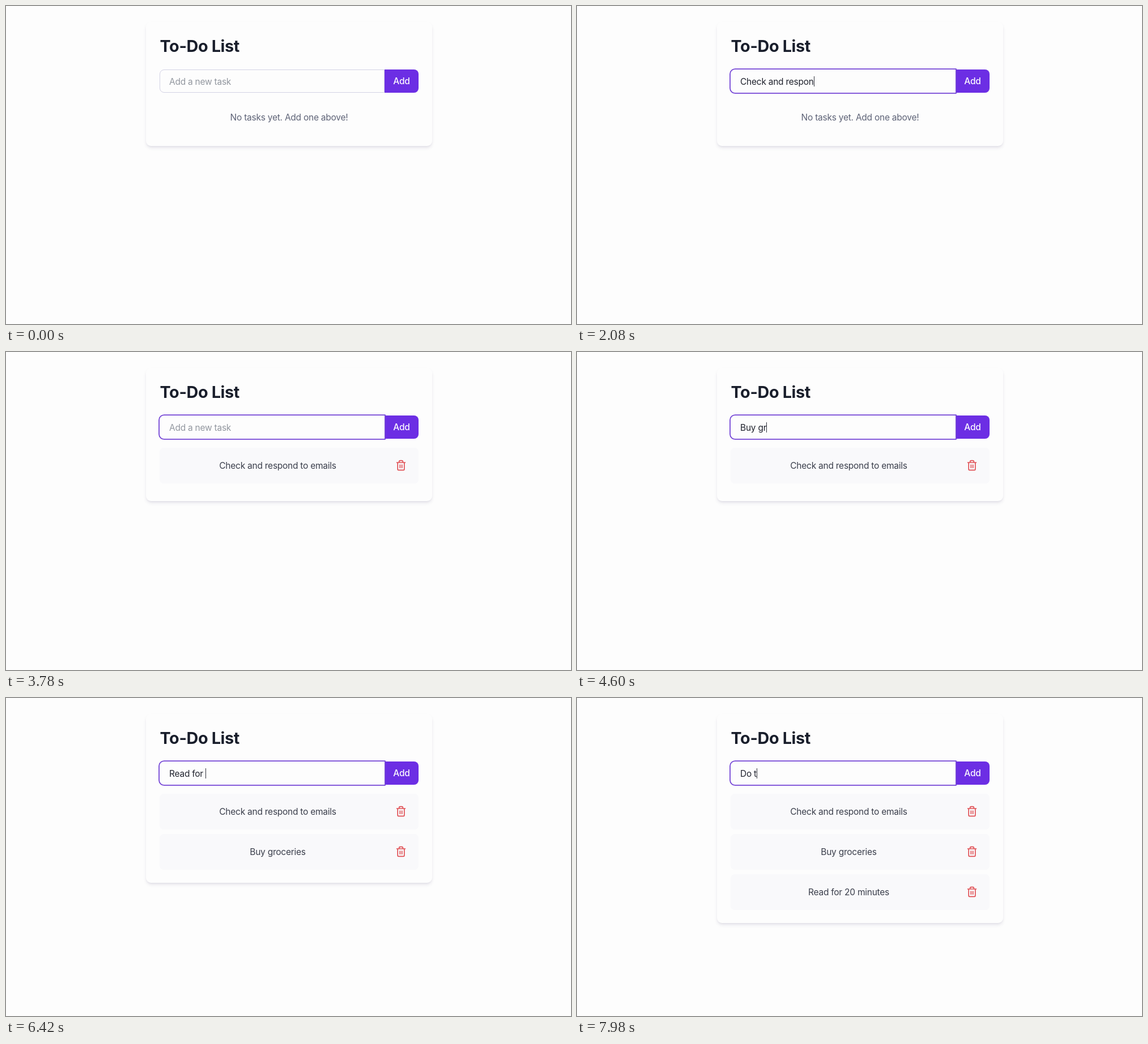
Recreate the animation shown at these times as an HTML page. Size 997x561 px, loop 8000 ms.

```html
<!DOCTYPE html>
<html lang="en">
<head>
<meta charset="utf-8">
<title>To-Do List</title>
<style>
  html, body { margin: 0; width: 100%; height: 100%; overflow: hidden; background: #fdfdfd; }
  body { position: relative; font: 15.5px/24px Inter, "Open Sans", sans-serif; letter-spacing: -.016em; }
  body > *, .item > * { position: absolute; box-sizing: border-box; margin: 0; white-space: pre; }
  #card {
    left: 247px; top: 28px; width: 505px; border-radius: 9px; background: #fdfdfd;
    box-shadow: 0 4px 6px -1px rgba(40, 30, 90, .1), 0 2px 4px -2px rgba(40, 30, 90, .1);
  }
  h1 { left: 271.5px; top: 52.5px; font-size: 28.8px; line-height: 36px; letter-spacing: -.013em; color: #191e2b; }
  #field {
    left: 271px; top: 111.5px; width: 397px; height: 41.5px; padding: 9px 16px 0;
    border: 1px solid #d3d2e4; border-radius: 8px 0 0 8px; color: #20232e;
  }
  #field.focus { border-color: transparent; box-shadow: 0 0 0 1.8px #7445d6; }
  #field.empty #text { color: #92979f; }
  #caret { position: absolute; top: 11px; width: 1px; height: 18px; background: #30323c; }
  #add {
    left: 668px; top: 111.5px; width: 60px; height: 41.5px; border-radius: 0 8px 8px 0;
    background: #6c2ee4; color: #fbf9ff; font-weight: 500; line-height: 42.5px; text-align: center;
  }
  #none { left: 247px; top: 185px; width: 505px; text-align: center; color: #5d6276; }
  .item { left: 271px; width: 457px; height: 63.5px; border-radius: 7px; background: #f9f9fb; color: #3a3e4b; }
  .item span { left: 0; top: 20px; width: 417px; text-align: center; }
  .item svg { left: 415.7px; top: 21.8px; width: 20px; height: 20px; }
</style>
</head>
<body>
<div id="card"></div>
<h1>To-Do List</h1>
<div id="add">Add</div>
<div id="field"><span id="text"></span><i id="caret"></i></div>
<div id="none">No tasks yet. Add one above!</div>
<script>
  const LOOP = 8000, FOCUS = 400;
  const BOTTOMS = [247, 263, 326, 397];
  // start: first keystroke, step: time per keystroke, done: time the task is added
  const TASKS = [
    { label: 'Check and respond to emails', start: 960, step: 73, done: 3000 },
    { label: 'Buy groceries', start: 4230, step: 72, done: 5260 },
    { label: 'Read for 20 minutes', start: 5830, step: 72, done: 7410 },
    { label: 'Do t', start: 7740, step: 75, done: Infinity },
  ];
  const TRASH = `<svg viewBox="0 0 24 24" fill="none" stroke="#e04d52" stroke-width="2"
    stroke-linecap="round" stroke-linejoin="round"><path d="M3 6h18M19 6v14a2 2 0 0 1-2 2H7a2 2 0 0 1-2-2V6
    M8 6V4a2 2 0 0 1 2-2h4a2 2 0 0 1 2 2v2M10 11v6M14 11v6"/></svg>`;

  const $ = id => document.getElementById(id);
  const card = $('card'), field = $('field'), text = $('text'), caret = $('caret'), none = $('none');

  const items = TASKS.slice(0, 3).map(({ label }, i) => {
    const item = document.createElement('div');
    item.className = 'item';
    item.style.top = 168.5 + 71 * i + 'px';
    item.innerHTML = `<span>${label}</span>${TRASH}`;
    document.body.append(item);
    return item;
  });

  function draw(t) {
    const count = TASKS.filter(task => t >= task.done).length;
    const { label, start, step } = TASKS[count];
    const typed = Math.max(0, Math.min(label.length, Math.floor((t - start) / step) + 1));
    const lastKey = typed ? start + (typed - 1) * step : count ? TASKS[count - 1].done : FOCUS;
    const focused = t >= FOCUS;

    card.style.height = BOTTOMS[count] - 28 + 'px';
    none.hidden = count > 0;
    items.forEach((item, i) => item.hidden = i >= count);
    field.className = (focused ? 'focus ' : '') + (typed ? '' : 'empty');
    text.textContent = typed ? label.slice(0, typed) : 'Add a new task';
    caret.style.left = 16 + (typed ? text.getBoundingClientRect().width : 0) + 'px';
    caret.hidden = !focused || (t - lastKey) % 1000 >= 500;
  }

  function tick(now) {
    draw(now % LOOP);
    requestAnimationFrame(tick);
  }
  draw(0);
  requestAnimationFrame(tick);
</script>
</body>
</html>
```
